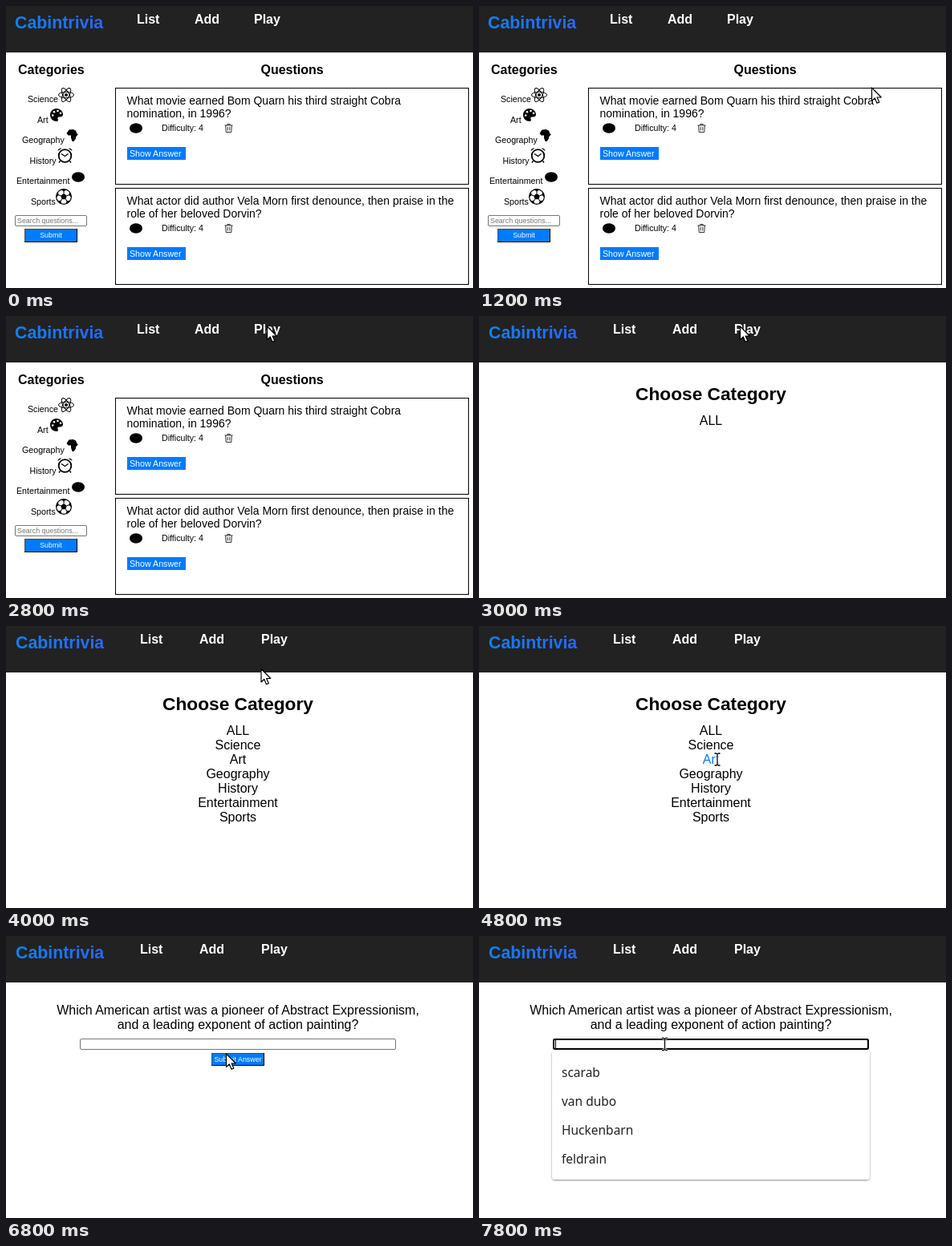
Write an HTML page that moves like this. It is 582 px wide and 352 px high and loops after 8000 ms.

```html
<!DOCTYPE html>
<html lang="en">
<head>
<meta charset="utf-8">
<title>Trivia walkthrough</title>
<style>
  html, body { margin: 0; width: 100%; height: 100%; overflow: hidden; background: #fff; }
  svg { display: block; font-family: "Liberation Sans", Arial, sans-serif; }
  .bold { font-weight: 700; }
  .mid { text-anchor: middle; }
  .menu { font-family: "Noto Sans", "Open Sans", sans-serif; font-weight: 500; fill: #222; }
  .line { fill: none; stroke: #000; }
</style>
</head>
<body>
<svg id="stage" width="582" height="352" viewBox="0 0 582 352"></svg>
<script>
const LOOP = 8000;
const BLUE = '#007bff';
const SMALL = 10.67, TINY = 8.89;
const CATEGORIES = ['Science', 'Art', 'Geography', 'History', 'Entertainment', 'Sports'];

// Drawing helpers
const text = (x, y, size, str, attrs = '') =>
  `<text x="${x}" y="${y}" font-size="${size}" ${attrs}>${str}</text>`;
const rect = (x, y, w, h, attrs = '') =>
  `<rect x="${x}" y="${y}" width="${w}" height="${h}" ${attrs}/>`;
const path = (d, attrs = '') => `<path d="${d}" ${attrs}/>`;
const at = (x, y, content) => `<g transform="translate(${x} ${y})">${content}</g>`;
const group = (id, content) => `<g id="${id}" display="none">${content}</g>`;
const rotated = (angles, shape) =>
  angles.map(a => `<g transform="rotate(${a})">${shape}</g>`).join('');

const field = (x, y, w, h) =>
  rect(x + .5, y + .5, w - 1, h - 1, 'rx="1.5" fill="#fff" stroke="#767676"');

const button = (x, y, w, h, label) =>
  rect(x, y, w, h, `fill="${BLUE}"`) +
  path(`M${x + .5} ${y + h}V${y + .5}H${x + w}`, 'fill="none" stroke="#4c4c4c"') +
  path(`M${x} ${y + h - .5}H${x + w - .5}V${y}`, 'class="line"') +
  text(x + w / 2, y + 11, TINY, label, 'class="mid" fill="#fff"');

const header = (logoX, ...navX) =>
  rect(0, 0, 582, 58, 'fill="#222"') +
  text(logoX, 28, 21.33, 'Cabintrivia', 'class="bold" fill="url(#logo)"') +
  ['List', 'Add', 'Play'].map((s, i) => text(navX[i], 22, 16, s, 'class="bold" fill="#fff"')).join('');

// Icons, each centred on its own origin
const blob = '<ellipse rx="8" ry="6.2"/>';
const icons = [
  rotated([0, 60, 120], '<ellipse class="line" rx="9.5" ry="3.8"/>') + '<circle r="2"/>',
  path('M0-8C-5-8-8-4-8 0C-8 5-4 8 0 8C2 8 2.400 6.500 1.500 5C.8 3 2 2.500 4 2.500C7 2.500 8 1 8-1C7.500-5 4-8 0-8Z') +
    [[-4.800, .5], [-3, -3.800], [1.500, -5], [5, -2.200]].map(([x, y]) => `<circle cx="${x}" cy="${y}" r="1.3" fill="#fff"/>`).join(''),
  path('M-4-7L1-7.500L4.500-6L6-2L7.500-1.500L4.500 2L4.500 4L2 7.500L0 7.500L-1.500 3L-1.500 0L-5 0L-7-2.500Z'),
  '<circle class="line" cy="1" r="7.8" stroke-width="1.8"/>' +
    path('M-9-5Q-8.500-9-4-8.500ZM9-5Q8.500-9 4-8.500Z') +
    path('M-4.500-1.500L0 1.500L4-1.500M-6 7.500L-7.500 9.500M6 7.500L7.500 9.500', 'class="line" stroke-width="1.4"'),
  blob,
  '<circle class="line" r="9.4" stroke-width="1.2"/>' + path('M0-4L3.800-1.200L2.400 3.300H-2.400L-3.800-1.200Z') +
    rotated([0, 72, 144, 216, 288], path('M0-4V-7', 'class="line"') + path('M-3.500-8.700L0-6.600L3.500-8.700L0-9.500Z')),
];
const trash = path('M-5-3.500H5M-1.700-3.500V-5H1.700V-3.500M-3.800-3.500L-3.300 5H3.300L3.800-3.500M-1.300-1.500V3M1.300-1.500V3',
  'fill="none" stroke="#333"');

const card = (y, lines) => at(136, y,
  rect(.5, .5, 440, 120, 'class="line"') +
  lines.map((s, i) => text(14.5, 21 + 16 * i, 14, s)).join('') +
  at(26, 50.5, blob) + at(141.5, 50.5, trash) +
  text(58, 54, SMALL, 'Difficulty: 4') +
  rect(15, 74, 73, 16, `fill="${BLUE}"`) +
  text(18, 86, SMALL, 'Show Answer', 'fill="#fff"'));

// Label x, then icon centre
const sidebar = [
  [27, 75, 111], [39, 63, 136], [20, 82.5, 161.5], [29.5, 73.5, 186], [13, 90, 213.5], [31, 72, 238],
];

const home = header(11, 163, 235, 309) +
  text(15, 85, 16, 'Categories', 'class="bold"') +
  text(317.5, 85, 16, 'Questions', 'class="bold"') +
  sidebar.map(([x, iconX, iconY], i) =>
    text(x, 120 + 25.6 * i, SMALL, CATEGORIES[i]) + at(iconX, iconY, icons[i])).join('') +
  field(11, 261, 90, 14) + text(14, 271, TINY, 'Search questions...', 'fill="#757575"') +
  button(23, 278, 66, 17, 'Submit') +
  card(102, ['What movie earned Bom Quarn his third straight Cobra', 'nomination, in 1996?']) +
  card(227, ['What actor did author Vela Morn first denounce, then praise in the', 'role of her beloved Dorvin?']);

const option = (label, i) => text(289, 136 + 18 * i, 16, label, `class="mid" id="option${i}"`);
const choose = text(289, 105, 22.7, 'Choose Category', 'class="mid bold"') + option('ALL', 0) +
  group('list', CATEGORIES.map((s, i) => option(s, i + 1)).join(''));

const ask =
  text(289, 98, 16, 'Which American artist was a pioneer of Abstract Expressionism,', 'class="mid"') +
  text(289, 116, 16, 'and a leading exponent of action painting?', 'class="mid"') +
  field(92, 128, 394, 14) + button(256, 146, 66, 16, 'Submit Answer') +
  group('menu', rect(91, 143, 396, 161, 'rx="4" fill="#fff" filter="url(#shadow)"') +
    ['scarab', 'van dubo', 'Huckenbarn', 'feldrain']
      .map((s, i) => text(103, 176 + 36 * i, 15.5, s, 'class="menu"')).join('')) +
  group('focus', rect(93, 129, 392, 12, 'rx="2" fill="#fff" stroke="#000" stroke-width="2"') +
    path('M95.500 130V140', 'class="line"'));

const outlined = 'fill="#fff" stroke="#000" stroke-width="1.2" stroke-linejoin="round"';
const beam = 'M-3.500-7.500H-1.500L0-6.500L1.500-7.500H3.500M0-6.500V6.500M-3.500 7.500H-1.500L0 6.500L1.500 7.500H3.500';
const cursors =
  group('arrow', path('M0 0V16.500L3.800 13L6.500 19.300L9.300 18.100L6.600 12H11.800Z', outlined)) +
  group('hand', path('M-2 9V-2a2 2 0 0 1 4 0V4.500q3.500-1 4 .8q3-.6 3.500 1q2.800-.3 2.800 2V12q0 5-3 6.500H1.500Q-1 15-5 9.500q-.8-2.500 1.500-2.300Z', outlined)) +
  group('beam', path(beam, 'fill="none" stroke="#fff" stroke-width="3"') + path(beam, 'class="line" stroke-width="1.3"'));

document.getElementById('stage').innerHTML = `<defs>
  <linearGradient id="logo"><stop stop-color="#0f80f0"/><stop offset="1" stop-color="#2468ff"/></linearGradient>
  <filter id="shadow"><feDropShadow dx="0" dy="1" stdDeviation="1.2" flood-opacity=".45"/></filter>
  </defs>` +
  group('home', home) +
  group('inner', header(12, 167, 241, 318)) +
  group('choose', choose) + group('ask', ask) +
  `<g id="pointer">${cursors}</g>`;

// Pointer steps: start time, shape, hotspot
const steps = [
  [0, 'none', 0, 0],
  [1200, 'arrow', 489.5, 102], [1400, 'arrow', 408, 67], [1600, 'arrow', 363, 48], [1800, 'arrow', 329, 26],
  [2000, 'hand', 326, 13], [2800, 'arrow', 325.5, 13], [3400, 'hand', 324, 13],
  [4000, 'arrow', 318, 53.5], [4200, 'beam', 314, 96], [4400, 'arrow', 305, 134],
  [4600, 'beam', 299, 158], [4800, 'beam', 297, 166.5],
  [5400, 'arrow', 309, 163], [6800, 'arrow', 274.5, 147], [7000, 'arrow', 246, 136], [7200, 'beam', 231.5, 135],
];

const el = id => document.getElementById(id);
const show = (id, on) => el(id).setAttribute('display', on ? 'inline' : 'none');

function draw() {
  const t = performance.now() % LOOP;
  show('home', t < 3000);
  show('inner', t >= 3000);
  show('choose', t >= 3000 && t < 5400);
  show('list', t >= 3200);
  show('ask', t >= 5400);
  show('focus', t >= 7200);
  show('menu', t >= 7800);

  const hovered = t < 4400 ? -1 : Math.min(2, Math.floor((t - 4400) / 200));
  for (let i = 0; i <= CATEGORIES.length; i++)
    el('option' + i).setAttribute('fill', i === hovered ? BLUE : '#000');

  const [, shape, x, y] = steps.findLast(step => step[0] <= t);
  for (const kind of ['arrow', 'hand', 'beam']) show(kind, kind === shape);
  el('pointer').setAttribute('transform', `translate(${x} ${y})`);
  requestAnimationFrame(draw);
}
draw();
</script>
</body>
</html>
```
